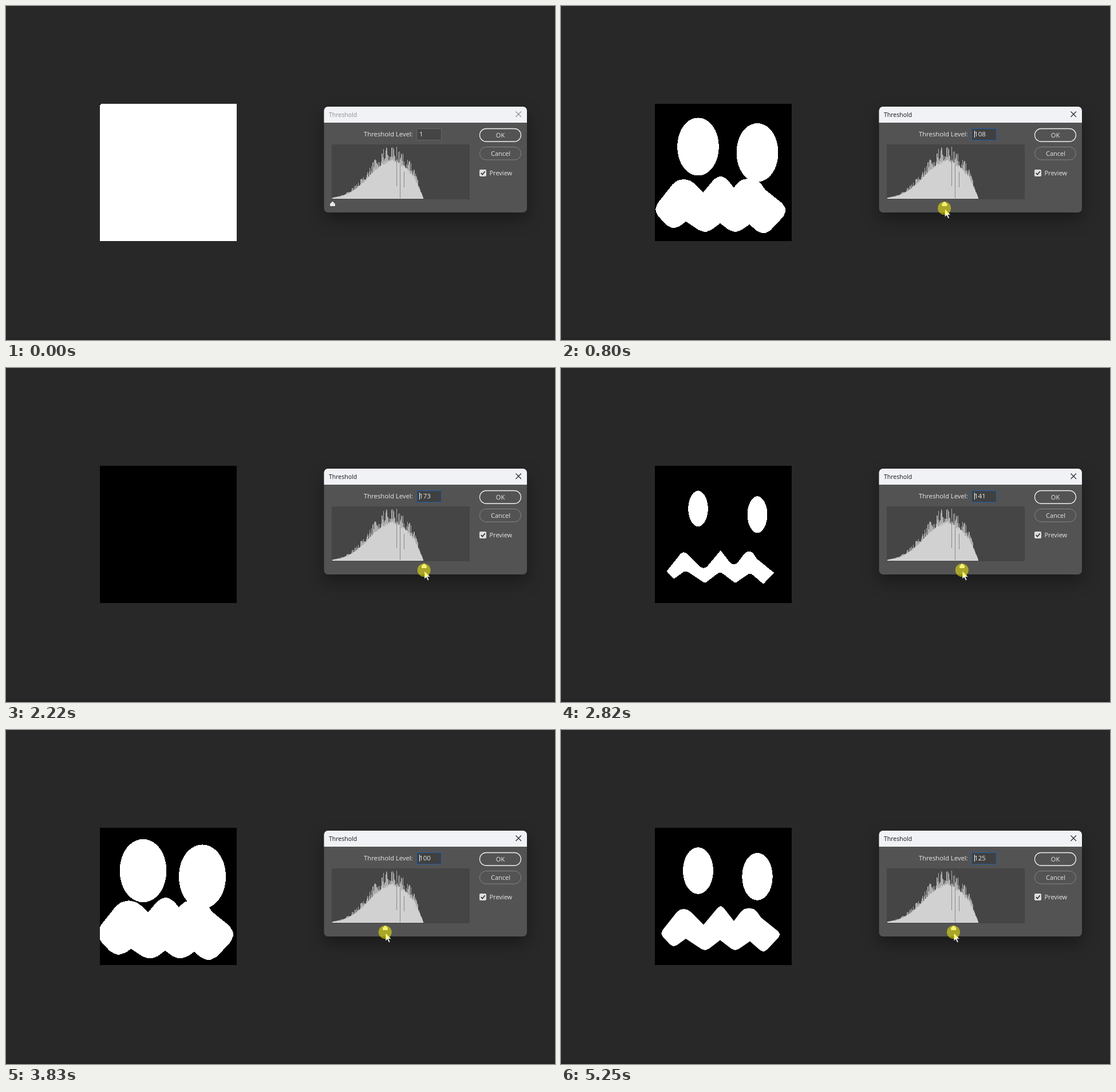
Recreate the animation shown at these times as an HTML page. Size 959 by 584 pixels, loop 5350 ms.

```html
<!DOCTYPE html>
<html lang="en">
<head>
<meta charset="utf-8">
<title>Threshold</title>
<style>
  html, body { margin: 0; width: 100%; height: 100%; overflow: hidden; background: #282828; }
  svg { display: block; width: 100%; height: 100%; }
  text { font: 11px "Open Sans", "Noto Sans", sans-serif; fill: #e8e8e8; }
  .panel { filter: drop-shadow(0 12px 14px rgba(0, 0, 0, .36)); }
  .shape { fill: #fff; stroke-linejoin: round; }
</style>
</head>
<body>
<svg viewBox="0 0 959 584">
  <defs>
    <clipPath id="frame"><rect x="164" y="171" width="239" height="240"/></clipPath>
    <clipPath id="dialog"><rect x="555.500" y="176" width="354.500" height="185" rx="7"/></clipPath>
  </defs>
  <rect width="959" height="584" fill="#282828"/>
  <rect y="580" width="959" height="4" fill="#242424"/>

  <g clip-path="url(#frame)" shape-rendering="crispEdges">
    <rect x="164" y="171" width="239" height="240"/>
    <path class="shape" id="mouth"/>
    <path class="shape" id="leftEye"/>
    <path class="shape" id="rightEye"/>
  </g>

  <g class="panel"><rect x="555.500" y="176" width="354.500" height="185" rx="7" fill="#535353"/></g>
  <g clip-path="url(#dialog)"><rect x="555" y="176" width="355" height="28" fill="#f0f2f6"/></g>
  <text id="title" x="564" y="193.500" style="font-size:10.5px">Threshold</text>
  <path id="close" d="M890.500 184.500l9.500 9.500m0-9.500l-9.500 9.500" fill="none" stroke-width="1.100"/>

  <text x="625" y="228" style="font-size:11.3px">Threshold Level:</text>
  <rect id="field" x="717.500" y="214.500" width="43" height="20" rx="1"/>
  <text id="value" x="722" y="228" style="font-size:11.6px"></text>
  <rect id="caret" x="722" y="218" width="1" height="12" fill="#fff"/>

  <rect x="827.500" y="214.500" width="72" height="22.500" rx="11.250" fill="none" stroke="#f2f2f2" stroke-width="1.300"/>
  <rect x="827.500" y="246.500" width="72" height="22.500" rx="11.250" fill="none" stroke="#858585"/>
  <g text-anchor="middle"><text x="863.500" y="230">OK</text><text x="864" y="262">Cancel</text></g>
  <rect x="827" y="286" width="12" height="12" rx="2" fill="#dedede"/>
  <path d="M829.700 292l2.500 2.700l4.500-5.500" fill="none" stroke="#333" stroke-width="1.800"/>
  <text x="844.500" y="296">Preview</text>

  <rect x="569" y="242" width="241" height="96" fill="#454545"/>
  <g shape-rendering="crispEdges">
    <path id="spikes" fill="#adadad"/>
    <path id="bars" fill="#d1d1d1"/>
    <path d="M682 262h1v53h-1zM688 276h1v61h-1zM695 290h1v27h-1z" fill="#898989"/>
    <path d="M570 336h159v1h-159z" fill="#e0e0e0"/>
  </g>

  <path id="handle" d="M0 341l5 5v4.500h-10v-4.500z" fill="#e9e9e9" stroke="#393939" stroke-width=".9"/>
  <g id="pointer">
    <path d="M.7 1v14.500l3.300-3l2.500 5.500l2.300-1l-2.500-5.300h4.600z" fill="#fff" stroke="#222" stroke-width=".7"/>
    <circle r="11.500" fill="#fffa00" fill-opacity=".5"/>
  </g>
</svg>
<script>
const $ = id => document.getElementById(id);
const LOOP = 5350, TICKS = 53;

// Where the slider is dragged to: [tick, level].
const drag = [[0, 1], [6, 88], [8, 108], [12, 139], [16, 156], [21, 174], [23, 172],
  [28, 141], [34, 112], [36, 97], [37, 97], [43, 117], [52, 125]];

// Corners of the zigzag mouth, clockwise from its left tip.
const corners = [[173, 356], [207, 313], [222, 313.5], [249, 341], [279, 305], [302, 334.5],
  [319, 312], [338, 312], [349, 328], [385, 357], [354, 390], [330, 369], [304, 387],
  [278, 367], [252, 387], [218, 364.5], [196, 380.5]];

const toPath = points => "M" + points.map(p => p.map(n => n.toFixed(2)).join(" ")).join("L") + "Z";

function ellipse(cx, cy, rx, ry, n = 48) {
  return toPath(Array.from({ length: n }, (_, i) => {
    const a = 2 * Math.PI * i / n;
    return [cx + rx * Math.cos(a), cy + ry * Math.sin(a)];
  }));
}

// Cuts the convex corners to a short curve and keeps the others sharp.
function rounded(points, cut) {
  const n = points.length;
  return toPath(points.flatMap((p, i) => {
    const a = points[(i + n - 1) % n], b = points[(i + 1) % n];
    const cross = (p[0] - a[0]) * (b[1] - p[1]) - (p[1] - a[1]) * (b[0] - p[0]);
    if (cross < 0) return [p];
    const toward = q => {
      const k = cut / Math.hypot(q[0] - p[0], q[1] - p[1]);
      return [p[0] + (q[0] - p[0]) * k, p[1] + (q[1] - p[1]) * k];
    };
    const u = toward(a), v = toward(b);
    return [u, [0, 1].map(j => (u[j] + 2 * p[j] + v[j]) / 4), v];
  }));
}

// A bell with a steep right end; random columns stand out above it.
function drawHistogram() {
  let seed = 11, bars = "", spikes = "";
  const random = () => (seed = seed * 16807 % 2147483647) / 2147483647;
  const column = (x, h) => `M${x} ${(337 - h).toFixed(1)}h1V337h-1z`;
  for (let x = 570; x < 729; x++) {
    const bell = 66 * Math.exp(-(((x - 673) / 38) ** 2) / 2);
    const h = Math.min(bell, (729 - x) * 2.3);
    const tall = random() < .4 ? 1.3 + random() * .13 : 1 + random() * .2;
    bars += column(x, h * (.95 + random() * .1));
    spikes += column(x, h * tall);
  }
  $("bars").setAttribute("d", bars);
  $("spikes").setAttribute("d", spikes);
}

function levelAt(tick) {
  const i = drag.findIndex(k => k[0] > tick);
  if (i < 0) return drag[drag.length - 1][1];
  const [a, u] = drag[i - 1], [b, v] = drag[i];
  return Math.round(u + (v - u) * (tick - a) / (b - a));
}

// Moves an outline outward, or inward when the distance is negative.
function grow(id, distance) {
  $(id).setAttribute("stroke", distance > 0 ? "#fff" : "#000");
  $(id).setAttribute("stroke-width", 2 * Math.abs(distance));
}

function render(t) {
  const tick = Math.min(TICKS - 1, Math.floor((t + 11) * TICKS / LOOP));
  const active = tick > 0, level = levelAt(tick);
  const x = 569.5 + level * .93;
  const offset = (127.5 - level) * .575;

  grow("leftEye", offset);
  grow("rightEye", offset);
  grow("mouth", offset - 1);

  $("title").style.fill = active ? "#111" : "#8d8d8d";
  $("close").setAttribute("stroke", active ? "#222" : "#8d8d8d");
  $("field").setAttribute("fill", active ? "#404040" : "#454545");
  $("field").setAttribute("stroke", active ? "#1c5fae" : "#666");
  $("value").textContent = level;
  $("handle").setAttribute("transform", `translate(${x} 0)`);
  $("pointer").setAttribute("transform", `translate(${x - .3} 353.5)`);
  for (const id of ["caret", "pointer"]) $(id).style.display = active ? "" : "none";
}

$("mouth").setAttribute("d", rounded(corners, 8));
$("leftEye").setAttribute("d", ellipse(239.5, 246, 25, 39.3));
$("rightEye").setAttribute("d", ellipse(343, 256.3, 25.2, 40));
drawHistogram();
render(0);

const begin = performance.now();
function loop() {
  render((performance.now() - begin) % LOOP);
  requestAnimationFrame(loop);
}
requestAnimationFrame(loop);
</script>
</body>
</html>
```
